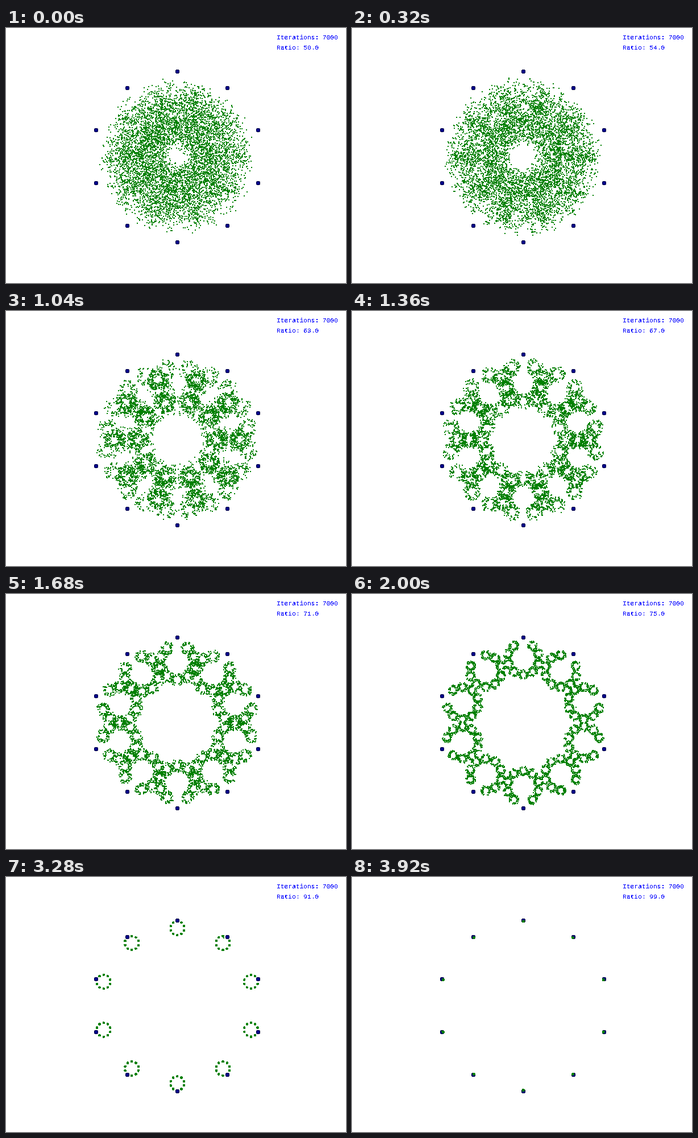
A matplotlib script for the animation above (4000 ms loop, 598 by 448 pixels).

```python
import numpy as np
import matplotlib.pyplot as plt
from matplotlib.animation import FuncAnimation

W, H, DPI = 598, 448, 100
FRAMES, STEP_MS = 50, 80
ITERATIONS = 7000
CENTER, RADIUS, SIDES = np.array([300.8, 225.74]), 149.8, 10
GREEN, NAVY, RIM = (0, 128, 0), (0, 0, 139), (0, 0, 64)

rng = np.random.default_rng(7)
angles = np.arange(SIDES) * 2 * np.pi / SIDES
corners = CENTER + RADIUS * np.column_stack([np.sin(angles), -np.cos(angles)])


def chaos_game():
    """Play one game per ratio, all side by side: (step, frame, xy)."""
    ratio = (50 + np.arange(FRAMES))[:, None] / 100
    pos = CENTER + rng.uniform(-1, 1, (FRAMES, 2)) * (200, 150)
    path = np.empty((ITERATIONS, FRAMES, 2))
    # A nonzero turn each step: the same corner never comes twice in a row.
    turns = rng.integers(1, SIDES, size=(ITERATIONS, FRAMES))
    picks = np.cumsum(turns, axis=0) % SIDES
    for step, pick in enumerate(picks):
        pos = pos + ratio * (corners[pick] - pos)
        path[step] = pos
    return path


path = chaos_game()


def draw_points(canvas, points):
    x, y = np.floor(points).astype(int).T
    for dx in (0, 1):
        for dy in (0, 1):
            canvas[y + dy, x + dx] = GREEN


def draw_corners(canvas):
    yy, xx = np.mgrid[-3:4, -3:4]
    dist = xx**2 + yy**2
    for color, limit in ((RIM, 13), (NAVY, 8)):
        disc = dist <= limit
        for x, y in np.rint(corners).astype(int):
            canvas[y + yy[disc], x + xx[disc]] = color


def render(frame):
    canvas = np.full((H, W, 3), 255, np.uint8)
    draw_corners(canvas)
    draw_points(canvas, path[:, frame])
    return canvas


fig = plt.figure(figsize=(W / DPI, H / DPI), dpi=DPI, facecolor="white")
picture = fig.figimage(render(0), origin="upper")


def label(text, baseline):
    return fig.text(476.5 / W, 1 - baseline / H, text, color="blue",
                    family="Liberation Mono", size=11.2 * 72 / DPI,
                    va="baseline", antialiased=False)


label(f"Iterations: {ITERATIONS}", 20)
ratio_label = label("Ratio: 50.0", 38)


def update(frame):
    picture.set_data(render(frame))
    ratio_label.set_text(f"Ratio: {50 + frame:.1f}")
    return picture, ratio_label


anim = FuncAnimation(fig, update, frames=FRAMES, interval=STEP_MS,
                     repeat=True, repeat_delay=0)
plt.show()
```
